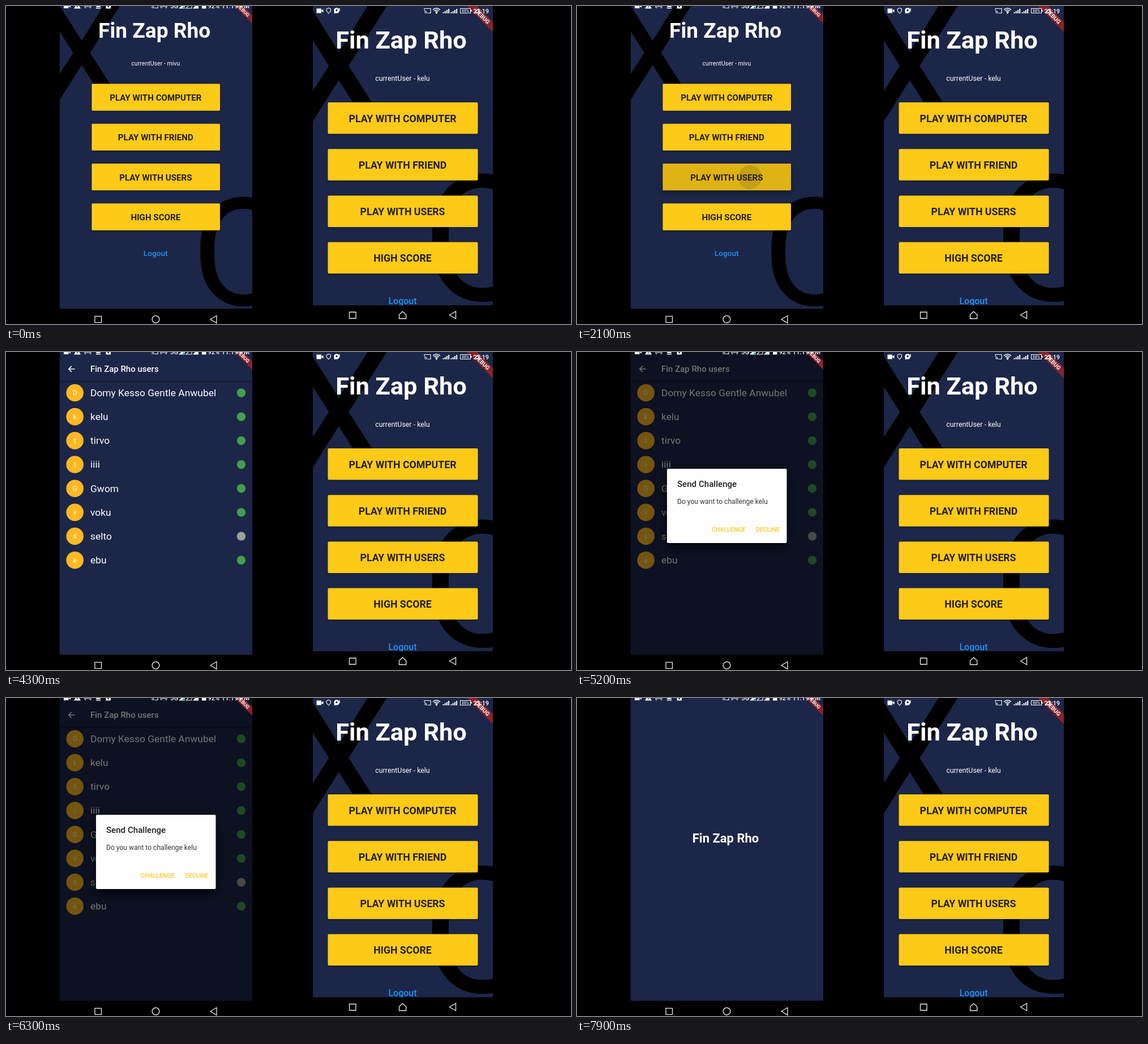
Animation of 998x561 px, one loop 8000 ms. Source, as an HTML page with a canvas:

```html
<!DOCTYPE html>
<html lang="en">
<head>
<meta charset="utf-8">
<title>Board game menu</title>
<style>
html, body { margin: 0; width: 100%; height: 100%; overflow: hidden; background: #000; }
canvas { display: block; width: 998px; height: 561px; }
</style>
</head>
<body>
<canvas id="stage" width="998" height="561"></canvas>
<script>
const ctx = document.getElementById('stage').getContext('2d');
const LOOP = 8000, STEP = 100;
const NAVY = '#1c2648', YELLOW = '#fcca17', WHITE = '#fff';
const GAME = 'Fin Zap Rho', RIVAL = 'kelu';
const USERS = ['Domy Kesso Gentle Anwubel', RIVAL, 'tirvo', 'iiii', 'Gwom', 'voku', 'selto', 'ebu'];
const OFFLINE = 6;
const BUTTONS = ['PLAY WITH COMPUTER', 'PLAY WITH FRIEND', 'PLAY WITH USERS', 'HIGH SCORE'];

// Each phone shares one layout: position, scale and size in layout units.
const LEFT = { x: 94.5, y: -8, s: 0.855, w: 398.2, h: 635.3, user: 'mivu' };
const RIGHT = { x: 542, y: 0, s: 1, w: 318, h: 528, user: RIVAL };
const SCREEN = { x: 94.5, y: 0, w: 340.5, h: 534 };

const clamp = v => Math.max(0, Math.min(1, v));
const ramp = (t, a, b) => clamp((t - a) / (b - a));
const easeOut = p => 1 - Math.pow(1 - p, 3);

function text(str, x, y, size, { color = WHITE, weight = 400, align = 'left' } = {}) {
  ctx.font = `${weight} ${size}px Roboto, sans-serif`;
  ctx.fillStyle = color;
  ctx.textAlign = align;
  ctx.fillText(str, x, y);
}

function rect(x, y, w, h, color) {
  ctx.fillStyle = color;
  ctx.fillRect(x, y, w, h);
}

function disc(x, y, r, color) {
  ctx.fillStyle = color;
  ctx.beginPath();
  ctx.arc(x, y, r, 0, Math.PI * 2);
  ctx.fill();
}

function poly(points, { fill, stroke, width = 1.4, open } = {}) {
  ctx.beginPath();
  points.forEach(([x, y]) => ctx.lineTo(x, y));
  if (!open) ctx.closePath();
  if (fill) { ctx.fillStyle = fill; ctx.fill(); }
  if (stroke) { ctx.strokeStyle = stroke; ctx.lineWidth = width; ctx.stroke(); }
}

function arc(x, y, r, a, b, width = 1.2) {
  ctx.strokeStyle = WHITE;
  ctx.lineWidth = width;
  ctx.beginPath();
  ctx.arc(x, y, r, a, b);
  ctx.stroke();
}

function card(x, y, w, h, color, blur, drop, shade) {
  ctx.save();
  ctx.shadowColor = `rgba(0,0,0,${shade})`;
  ctx.shadowBlur = blur;
  ctx.shadowOffsetY = drop;
  ctx.fillStyle = color;
  ctx.beginPath();
  ctx.roundRect(x, y, w, h, 2);
  ctx.fill();
  ctx.restore();
}

function enter(phone) {
  ctx.save();
  ctx.translate(phone.x, phone.y);
  ctx.scale(phone.s, phone.s);
  ctx.beginPath();
  ctx.rect(0, 0, phone.w, phone.h);
  ctx.clip();
}

function ripple(x, y, w, h, press) {
  ctx.save();
  ctx.beginPath();
  ctx.rect(x, y, w, h);
  ctx.clip();
  rect(x, y, w, h, `rgba(0,0,0,${0.115 * press.glow})`);
  if (press.r > 0) disc(246.8, 362.6, press.r, `rgba(0,0,0,${0.115 * press.fade})`);
  ctx.restore();
}

function menu(phone, press) {
  const { w, h } = phone, mid = w / 2;
  enter(phone);
  rect(0, 0, w, h, NAVY);
  text('X', 45.5, 217, 310, { color: '#000', align: 'center' });
  text('O', w - 18.5, h - 9, 310, { color: '#000', align: 'center' });
  text(GAME, mid - 3, 75, 43.4, { weight: 700, align: 'center' });
  text('currentUser - ' + phone.user, mid - 0.5, 132.3, 12.4, { align: 'center' });
  BUTTONS.forEach((label, i) => {
    const x = mid - 132.5, y = 170 + 82.2 * i, held = press && i === 2;
    const glow = held ? press.glow : 0;
    card(x, y, 265, 55.5, YELLOW, 3 + 6 * glow, 1 + 2 * glow, 0.4);
    if (held) ripple(x, y, 265, 55.5, press);
    text(label, mid - 0.5, y + 34.8, 17.7, { color: '#251f10', weight: 700, align: 'center' });
  });
  text('Logout', mid - 0.5, 525.5, 16, { color: '#1f92f6', weight: 500, align: 'center' });
  ctx.restore();
}

function userList() {
  rect(94.5, 0, 340.5, 534, NAVY);
  const shade = ctx.createLinearGradient(0, 50, 0, 55);
  shade.addColorStop(0, 'rgba(0,0,0,.4)');
  shade.addColorStop(1, 'rgba(0,0,0,0)');
  rect(94.5, 50.5, 340.5, 5, shade);
  const line = { stroke: WHITE, width: 1.6, open: true };
  poly([[121.5, 30], [111, 30]], line);
  poly([[116, 24.8], [110.8, 30], [116, 35.2]], line);
  text(GAME + ' users', 149, 35.2, 15, { weight: 500 });
  USERS.forEach((name, i) => {
    const y = 72 + 42.17 * i;
    disc(121.7, y, 15.3, '#fdb924');
    text(name[0], 121.7, y + 4.4, 12.2, { color: '#fff3d6', align: 'center' });
    text(name, 149, y + 5.9, 17.4);
    disc(415.5, y, 7.7, i === OFFLINE ? '#9e9e9e' : '#43a04b');
  });
}

function dialog(alpha) {
  ctx.save();
  ctx.globalAlpha = alpha;
  rect(94.5, 0, 340.5, 534, 'rgba(0,0,0,.54)');
  card(159, 206, 211.5, 131, '#fefefe', 22, 9, 0.6);
  text('Send Challenge', 177, 238, 15.1, { color: '#212121', weight: 500 });
  text(`Do you want to challenge ${RIVAL}`, 177, 267.5, 12.1, { color: '#353535' });
  const action = { color: '#f8c822', weight: 500 };
  text('CHALLENGE', 238, 317, 10.6, action);
  text('DECLINE', 316, 317, 10.6, action);
  ctx.restore();
}

function splash() {
  rect(94.5, 0, 340.5, 534, NAVY);
  text(GAME, 262.5, 255, 22, { weight: 700, align: 'center' });
}

// A new page rises while it fades in.
function rise(p, page) {
  if (p <= 0) return;
  ctx.save();
  ctx.globalAlpha = p;
  ctx.translate(0, 133 * (1 - easeOut(p)));
  page();
  ctx.restore();
}

function banner(phone) {
  const { w } = phone;
  enter(phone);
  poly([[w - 46, 0], [w - 28, 0], [w, 28], [w, 46]], { fill: '#87242b' });
  ctx.translate(w - 18.5, 18.5);
  ctx.rotate(Math.PI / 4);
  text('DEBUG', 0, 3.6, 10, { weight: 700, align: 'center' });
  ctx.restore();
}

function signal(x, y, size) {
  for (let i = 0; i < 4; i++) {
    const h = size * (i + 1) / 4;
    rect(x + i * 3.2, y - h, 2, h, WHITE);
  }
}

function camera(x, y) {
  rect(x, y, 8.5, 8, WHITE);
  poly([[x + 8, y + 4], [x + 12, y + 1], [x + 12, y + 7]], { fill: WHITE });
}

function cast(x, y) {
  poly([[x, y + 3], [x, y], [x + 11, y], [x + 11, y + 8], [x + 6, y + 8]], { stroke: WHITE, width: 1.1, open: true });
  arc(x, y + 8.5, 2, -Math.PI / 2, 0);
  arc(x, y + 8.5, 4.4, -Math.PI / 2, 0);
}

function waves(x, y) {
  disc(x, y, 1.4, WHITE);
  for (const r of [3.2, 5.6]) {
    arc(x, y, r, -0.8, 0.8);
    arc(x, y, r, Math.PI - 0.8, Math.PI + 0.8);
  }
}

function statusRight() {
  camera(548.5, 4.5);
  poly([[569.8, 3.6], [573.5, 5], [573.3, 9], [569.8, 13], [566.3, 9], [566.1, 5]], { stroke: WHITE, width: 1.1 });
  disc(584, 8, 4.8, WHITE);
  poly([[580, 9], [579.5, 13.5], [584, 12]], { fill: WHITE });
  disc(584, 7.5, 1.7, NAVY);
  rect(588.3, 4, 1.4, 5, WHITE);
  cast(739, 4.5);
  for (const r of [3, 6, 9]) arc(760.5, 13, r, -Math.PI * 0.75, -Math.PI * 0.25, 1.5);
  disc(760.5, 12.4, 1.3, WHITE);
  signal(771.5, 13, 8);
  signal(785.5, 13, 8);
  ctx.strokeStyle = WHITE;
  ctx.lineWidth = 1;
  ctx.strokeRect(802.5, 4.5, 18, 8);
  rect(821, 7, 1.5, 3, WHITE);
  text('88%', 811.5, 11.2, 7, { align: 'center' });
  text('23:19', 825.5, 13, 10.8, { weight: 500 });
}

function statusLeft() {
  ctx.save();
  ctx.beginPath();
  ctx.rect(SCREEN.x, 0, SCREEN.w, 12);
  ctx.clip();
  camera(102, -4);
  poly([[126, -6], [132, 4.5], [120, 4.5]], { fill: WHITE });
  rect(125.4, 0, 1.2, 2.6, NAVY);
  waves(144.5, 0);
  poly([[163, -4], [167.5, 2], [158.5, 2]], { fill: WHITE });
  rect(159, 3, 8, 1.5, WHITE);
  rect(176.5, -4, 8.5, 8.5, WHITE);
  disc(180.7, 1, 1.4, NAVY);
  cast(257, -4.5);
  waves(278.5, 0);
  text('5G', 290, 4, 11.5, { weight: 500 });
  poly([[305, 4.5], [316, 4.5], [316, -6]], { fill: WHITE });
  rect(312, 1, 4, 3.5, '#2fb6a5');
  poly([[318, 4], [328, 4], [328, -6]], { stroke: WHITE, width: 1.1 });
  poly([[330, 4.5], [340, 4.5], [340, -6]], { fill: WHITE });
  rect(346, -4, 7.5, 8.5, WHITE);
  text('92%', 356.5, 4, 11, { weight: 500 });
  text('11:19 PM', 380.5, 4, 11.5, { weight: 500 });
  ctx.restore();
}

function navBars() {
  const line = { stroke: '#eee', width: 1.3 };
  const box = (x, y) => poly([[x, y], [x + 11.5, y], [x + 11.5, y + 11], [x, y + 11]], line);
  const back = (x, y) => poly([[x, y], [x + 11, y - 6.5], [x + 11, y + 6.5]], line);
  box(157, 547.3);
  arc(264.5, 552.8, 6.4, 0, Math.PI * 2, 1.3);
  back(361, 552.8);
  box(606.5, 540);
  poly([[694.5, 544.5], [700.6, 539], [706.7, 544.5], [706.7, 551.5], [694.5, 551.5]], line);
  back(783.5, 545.2);
}

function touch(t) {
  const alpha = ramp(t, 800, 900) * (1 - ramp(t, 1100, 1300));
  if (!alpha) return;
  ctx.save();
  ctx.globalAlpha = alpha;
  disc(305.5, 302, 8.7, 'rgba(225,220,195,.55)');
  disc(305.5, 302, 5.8, 'rgba(235,230,210,.5)');
  ctx.restore();
}

function draw(t) {
  rect(0, 0, 998, 561, '#000');
  menu(RIGHT);

  ctx.save();
  ctx.beginPath();
  ctx.rect(SCREEN.x, SCREEN.y, SCREEN.w, SCREEN.h);
  ctx.clip();
  const listIn = ramp(t, 2200, 2500), splashIn = ramp(t, 6400, 6505);
  if (listIn < 1) {
    const spread = ramp(t, 2100, 2400);
    menu(LEFT, {
      glow: ramp(t, 1800, 2000) * (1 - ramp(t, 2200, 2400)),
      r: 24.5 * ramp(t, 1900, 2100) + 150 * spread,
      fade: 1 - spread
    });
    touch(t);
  }
  if (splashIn < 1) rise(listIn, userList);
  // The answer closes the dialog at once, as the next page comes in.
  const asked = ramp(t, 4800, 5000) * (1 - ramp(t, 6400, 6500));
  if (asked) dialog(asked);
  rise(splashIn, splash);
  ctx.restore();

  banner(LEFT);
  banner(RIGHT);
  statusLeft();
  statusRight();
  navBars();
}

const start = performance.now();
function frame() {
  const t = (performance.now() - start) % LOOP;
  draw(Math.floor(t / STEP) * STEP);
  requestAnimationFrame(frame);
}
frame();
</script>
</body>
</html>
```
